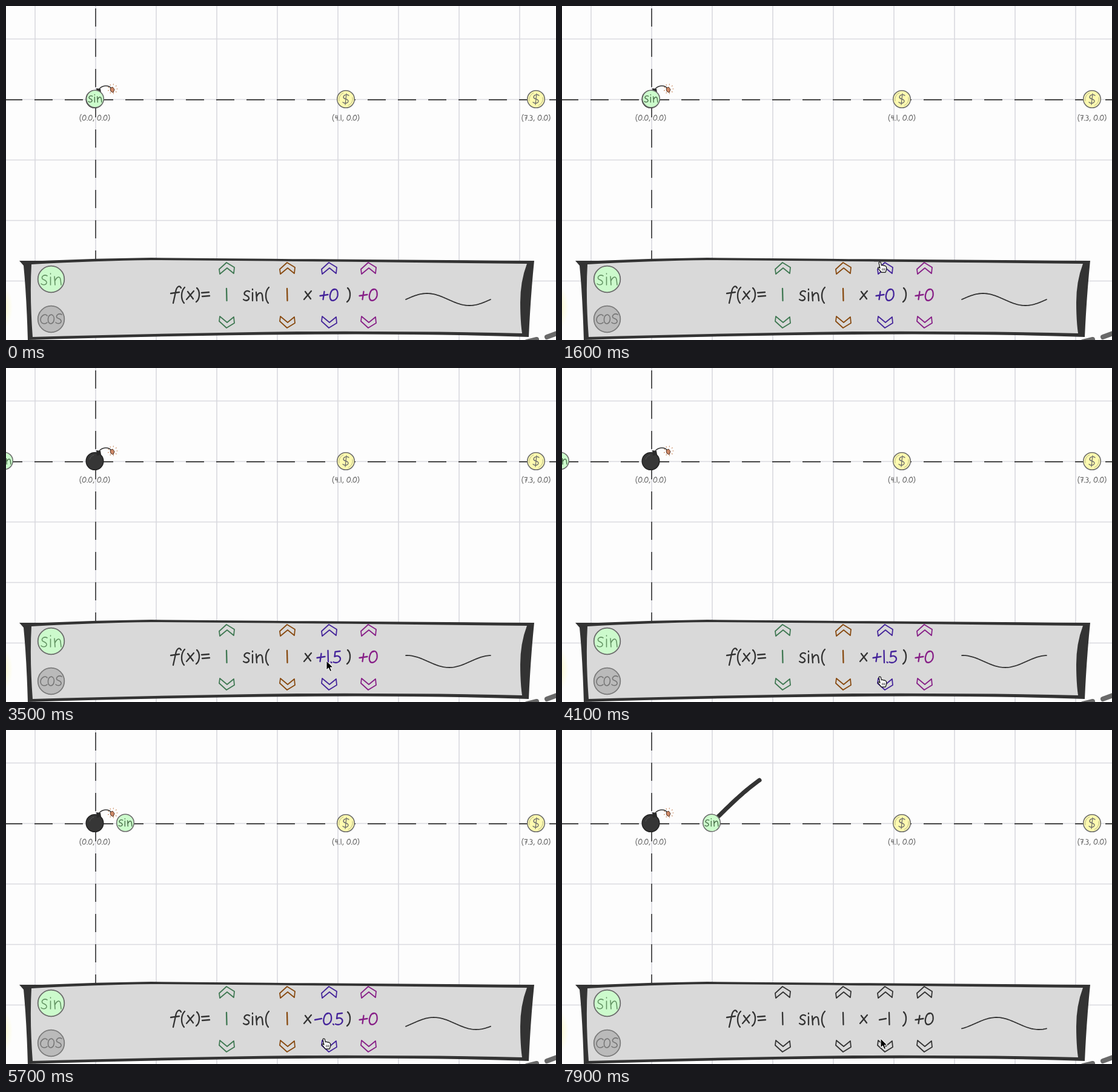
Recreate the animation shown at these times as an HTML page. Size 908x552 px, loop 8 s.

```html
<!DOCTYPE html>
<html lang="en">
<head>
<meta charset="utf-8">
<title>Function bomb</title>
<style>
html, body { margin: 0; width: 100%; height: 100%; overflow: hidden; background: #fdfdfd; }
svg { display: block; width: 100vw; height: 100vh; }
.line { fill: none; stroke-linecap: round; stroke-linejoin: round; }
.launched .tint { stroke: #333; }
</style>
</head>
<body>
<svg id="stage" viewBox="0 0 908 552" xmlns="http://www.w3.org/2000/svg"></svg>
<script>
const LOOP = 8000, STEP = 100, UNIT = 100;
const ORIGIN = { x: 147, y: 154 };
const INK = '#333333', GREY = '#6b6b6b';
const GREEN = '#3f7852', BROWN = '#87490f', PURPLE = '#44249a', PINK = '#871f87';

// Handwritten stroke glyphs: [width, path], baseline at y = 0
const GLYPHS = {
  '0': [13, 'M8-19C2-19-1-8 1-3C3 2 11 0 13-8C14-16 11-21 6-18'],
  '1': [4, 'M2-20L2.5 0'],
  '3': [10, 'M1-18C10-20 11-11 4-10C12-10 11 2 0 0'],
  '4': [10, 'M3-18L1-9L9-9M8-18L8 0'],
  '5': [12, 'M3-18L11-19M3-18L2-10C8-13 13-9 11-4C9 0 4 1 0-1'],
  '7': [10, 'M0-18L10-18L4 0M3-9L9-9'],
  '+': [13, 'M0-8L13-10M7-15L5-2'],
  '-': [11, 'M0-8L11-10'],
  '.': [1, 'M0-1L1 0'],
  ',': [2, 'M2-2L0 3'],
  ' ': [5, ''],
  '(': [6, 'M6-22C0-16-1-3 5 4'],
  ')': [6, 'M1-21C7-16 6-2 0 2'],
  '=': [13, 'M0-13L12-14M1-7L13-8'],
  'f': [14, 'M17-21C14-27 9-22 8-14L4 4M0-12L14-14'],
  'x': [13, 'M2-15L11-3M12-16L0-2'],
  's': [10, 'M10-15C5-18 0-14 2-10C4-8 10-8 9-3C7 1 2 0 0-2'],
  'i': [2, 'M1-13L1 0M1-19L1-18'],
  'n': [12, 'M1-14L2 0M2-7C5-14 10-15 11-9L12 0'],
  'c': [11, 'M11-13C8-18 0-13 0-6C1 1 8 1 11-2'],
  'o': [12, 'M6-15C-1-14-1-2 4 0C11 1 13-13 6-15']
};

function write(text, x, y, { size = 1, gap = 3, color = INK, width = 2.3, center = false, cls = '' } = {}) {
  let pen = 0, body = '';
  for (const ch of text) {
    const [advance, d] = GLYPHS[ch];
    if (d) body += `<path d="${d}" transform="translate(${pen} 0)"/>`;
    pen += advance + gap;
  }
  const left = center ? x - (pen - gap) * size / 2 : x;
  return `<g role="img" aria-label="${text}" class="line ${cls}" stroke="${color}" stroke-width="${width / size}"
    transform="translate(${left} ${y}) scale(${size})">${body}</g>`;
}

const path = (d, attrs = '') => `<path d="${d}" ${attrs}/>`;
const disc = (x, y, r, fill, stroke, width = 1.5) =>
  `<circle cx="${x}" cy="${y}" r="${r}" fill="${fill}" stroke="${stroke}" stroke-width="${width}"/>`;

function grid() {
  let lines = '';
  for (let k = 0; k < 9; k++) lines += `M${48 + 100 * k} 0V552`;
  for (let k = 0; k < 5; k++) lines += `M0 ${54.5 + 100 * k}H908`;
  return path(lines, 'stroke="#d9d9df" stroke-width="1.6"')
    + path('M148 4V420M-3 155H908', 'stroke="#474747" stroke-width="1.8" stroke-dasharray="30 20"');
}

const coordLabel = (text, x) =>
  write(text, x, 189, { size: .45, gap: 4.2, color: GREY, width: 1.2, center: true });

const coin = (x, label) => disc(x, 154, 14.3, '#fdfab0', GREY)
  + path(`M${x - 11} 157A11.5 11.5 0 0 1 ${x - 4} 143.5M${x + 11} 151A11.5 11.5 0 0 1 ${x + 4} 164.5`,
    'class="line" stroke="#b9b78a" stroke-width="1"')
  + path('M5-6C2-9-4-7-4-3C-3 1 5-1 4 4C2 8-3 7-5 5M1-9L-1 9',
    `class="line" stroke="${GREY}" stroke-width="1.3" transform="translate(${x} 154)"`)
  + coordLabel(label, x);

function bomb() {
  let sparks = '';
  for (let k = 0; k < 9; k++) {
    const a = k * Math.PI * 2 / 9, c = Math.cos(a), s = Math.sin(a);
    sparks += `M${176 + 6.5 * c} ${137 + 6.5 * s}L${176 + 8.5 * c} ${137 + 8.5 * s}`;
  }
  return disc(146.5, 154, 14.3, '#363636', '#222')
    + path('M138 151Q140 145 145 144', 'class="line" stroke="#555" stroke-width="1"')
    + path('M149 136L156 137L157 143L150 145Z', 'fill="#2a2a2a"')
    + path('M154 137C159 131 169 130 174 136', 'class="line" stroke="#333" stroke-width="1.4"')
    + path(sparks, 'stroke="#c98a60" stroke-width="1.1"')
    + path('M172 136L176 134L179 138L177 143L173 141Z', 'fill="#d08a68" stroke="#553322" stroke-width="1"');
}

const panel = () =>
  path('M22 421L60 421Q150 417 240 416Q450 418 872 421Q866 480 863 547Q680 541 480 543Q250 545 36 552Q34 480 29 429Z',
    `fill="${INK}"`)
  + path('M42 427Q150 421 240 420Q500 422 860 426Q849 455 849 490Q849 520 852 541Q680 537 480 538Q250 541 44 547Q39 480 42 427Z',
    'fill="#d9d9d9"');

const chevron = (x, y, flip, color) =>
  path('M-12 2L0-9L13-1L12 9L1 0L-11 10Z',
    `class="line tint" stroke="${color}" stroke-width="1.8" transform="translate(${x} ${y}) scale(1 ${flip})"`);

const chevrons = (x, color) => chevron(x, 433, 1, color) + chevron(x, 523, -1, color);

const tinted = (color, extra) => ({ color, cls: 'tint', ...extra });

const $ = id => document.getElementById(id);
const stage = $('stage');
stage.innerHTML = `
  <defs><radialGradient id="glow">
    <stop offset="0" stop-color="#fbf8c8"/><stop offset="1" stop-color="#fbf8c8" stop-opacity="0"/>
  </radialGradient></defs>
  <rect width="908" height="552" fill="#fdfdfd"/>
  ${grid()}
  <ellipse cx="-6" cy="498" rx="17" ry="36" fill="url(#glow)"/>
  ${path('M860 555L876 551M893 547L912 540', 'class="line" stroke="#696969" stroke-width="8"')}
  ${coin(561, '(4.1, 0.0)')}${coin(875, '(7.3, 0.0)')}
  ${bomb()}${coordLabel('(0.0, 0.0)', 146.5)}
  <path id="trail" class="line" stroke="${INK}" stroke-width="7"/>
  <g id="ball">${disc(0, 0, 14.3, '#ccfccc', GREY)}
    ${write('sin', 0, 5.5, { size: .66, gap: 4.5, color: '#4c704c', width: 1.4, center: true })}</g>
  ${panel()}
  ${disc(74.5, 451.5, 21.8, '#ccfacc', GREY, 1.8)}
  ${write('sin', 74.5, 461, { gap: 4.5, color: '#649464', width: 1.6, center: true })}
  ${disc(74.5, 517.5, 21.8, '#bababa', '#7b7b7b', 1.8)}
  ${write('cos', 74.5, 525, { gap: 1, color: '#757575', width: 1.6, center: true })}
  ${write('f(x)=', 272, 487)}${write('1', 362, 487, tinted(GREEN))}
  ${write('sin(', 392, 487, { gap: 4 })}${write('1', 462, 487, tinted(BROWN))}
  ${write('x', 492, 487)}<g id="shift"></g>${write(')', 563, 487)}
  ${write('+0', 598, 487, tinted(PINK, { center: true }))}
  ${chevrons(364, GREEN)}${chevrons(464, BROWN)}${chevrons(533, PURPLE)}${chevrons(598, PINK)}
  <path id="wave" class="line" stroke="${INK}" stroke-width="1.8"/>
  <g id="cursor">
    ${path('M0 0V15L3.5 11.8L6 17.5L8.6 16.4L6.2 10.9H11Z', 'id="arrow" fill="#000" stroke="#fff" stroke-width="1"')}
    <g id="hand" transform="translate(-1.5 0) scale(.95)">
      ${path('M-1.5 1.2Q0-1 1.8 1L3 6L5 5.5L7 6.5L9 6.5L11.5 8.5L12 13L10 18H3L-3 11Q-3.5 9-1 9.5L.5 11Z',
        'fill="#fff" stroke="#000" stroke-width="1.2" stroke-linejoin="round"')}
      ${path('M4.5 11V15M6.8 11V15M9 11V15', 'stroke="#000" stroke-width=".8"')}
    </g>
  </g>`;

const LAUNCH = 7500, SPEED = 1.975;
const RAISES = [2100, 2600, 3000];
const LOWERS = [4200, 4700, 5200, 5600, 6100];
const ROUTE = [
  [1200, 545, 560], [1500, 526, 423], [1700, 526, 423], [2000, 530, 432], [3200, 530, 432],
  [3500, 529, 484], [3800, 526, 510], [8000, 526, 510]
];

const countPast = (times, t) => times.filter(at => at <= t).length;

function pointerAt(t) {
  const i = ROUTE.findIndex(([at]) => at > t);
  if (i < 1) return null;
  const [t0, x0, y0] = ROUTE[i - 1], [t1, x1, y1] = ROUTE[i];
  const k = (t - t0) / (t1 - t0);
  return { x: x0 + (x1 - x0) * k, y: y0 + (y1 - y0) * k };
}

function curve(from, to, step, fn) {
  let d = '';
  const n = Math.max(1, Math.ceil((to - from) / step));
  for (let i = 0; i <= n; i++) {
    const x = from + (to - from) * i / n;
    d += `${i ? 'L' : 'M'}${x.toFixed(2)} ${fn(x).toFixed(2)}`;
  }
  return d;
}

const show = (id, on) => $(id).setAttribute('visibility', on ? 'visible' : 'hidden');

function draw(t) {
  const phase = .5 * (countPast(RAISES, t) - countPast(LOWERS, t));
  const launched = t >= LAUNCH;
  const ballX = ORIGIN.x - phase * UNIT;

  stage.classList.toggle('launched', launched);
  $('ball').setAttribute('transform', `translate(${ballX} 153.5)`);
  $('shift').innerHTML = write((phase < 0 ? '' : '+') + phase, 533, 487, tinted(PURPLE, { center: true }));
  $('wave').setAttribute('d',
    curve(660, 800, 2, x => 485 - 10 * Math.sin((x - 660) / 140 * Math.PI * 2 + phase)));

  const reach = (t - LAUNCH) / 1000 * SPEED * UNIT;
  $('trail').setAttribute('d', reach > 0
    ? curve(ballX, ballX + reach, 3, x => ORIGIN.y - UNIT * Math.sin((x - ballX) / UNIT)) : '');

  const p = pointerAt(t);
  const onButton = p && !launched && Math.abs(p.x - 533) < 15
    && (Math.abs(p.y - 433) < 13 || Math.abs(p.y - 523) < 14);
  show('arrow', p && !onButton);
  show('hand', onButton);
  if (p) $('cursor').setAttribute('transform', `translate(${p.x} ${p.y})`);
}

const start = performance.now();
function tick() {
  // The picture holds still between steps; the offset absorbs timer jitter
  const t = Math.floor((performance.now() - start + 25) / STEP) * STEP % LOOP;
  draw(t);
  requestAnimationFrame(tick);
}
tick();
</script>
</body>
</html>
```
